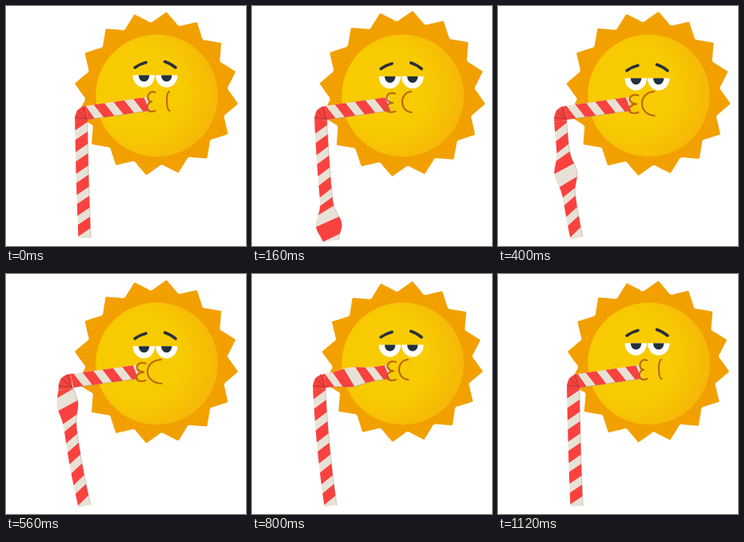
An HTML page for the animation above (1.2 s loop, 300 by 300 pixels).

```html
<!DOCTYPE html>
<html lang="en">
<head>
<meta charset="utf-8">
<title>Sipping sun</title>
<style>
  html, body { margin: 0; width: 100%; height: 100%; overflow: hidden; background: #fff; }
  svg { display: block; width: 100vw; height: 100vh; }
  .line { fill: none; stroke-linecap: round; stroke-linejoin: round; }
</style>
</head>
<body>
<svg viewBox="0 0 300 300">
  <defs>
    <radialGradient id="skin" cx=".36" cy=".45" r=".66">
      <stop offset="0" stop-color="#f8cc00"/>
      <stop offset=".55" stop-color="#f8ca02"/>
      <stop offset=".8" stop-color="#f6bf05"/>
      <stop offset="1" stop-color="#f5b606"/>
    </radialGradient>
  </defs>
  <path id="rays" fill="#f2a000" stroke="#f2a000" stroke-width="2" stroke-linejoin="round"/>
  <circle cx="188.5" cy="112" r="76.3" fill="url(#skin)"/>
  <g id="face">
    <g class="line" stroke="#29303a" stroke-width="3.6">
      <path d="M161 77Q167 72.500 175 70.500"/>
      <path d="M198.500 69.500Q205 71.500 212 77"/>
    </g>
    <g fill="#fff">
      <path d="M158.500 86.500H186A13.750 15.300 0 0 1 158.500 86.500"/>
      <path d="M187 86.500H214.500A13.750 15.300 0 0 1 187 86.500"/>
    </g>
    <g fill="#22303c">
      <path d="M165.800 86.500H179.200A6.700 8 0 0 1 165.800 86.500"/>
      <path d="M194 86.500H207.400A6.700 8 0 0 1 194 86.500"/>
    </g>
  </g>
  <path id="tube" fill="#e8e2d6"/>
  <path id="stripes" fill="#f9423f"/>
  <path id="elbow" fill="#f4433f"/>
  <path id="folds" class="line" stroke="#b93431" stroke-width="1"/>
  <path id="shade" class="line" stroke="#8d6a58" stroke-opacity=".25" stroke-width="1.4"/>
  <g class="line" stroke="#bd6414" stroke-width="2.1">
    <path id="lips"/>
    <path id="cheek"/>
  </g>
</svg>
<script>
const LOOP = 1200, STEP = 80;
const fields = ['time', 'bend', 'mouth', 'drop', 'radius', 'lump', 'swell', 'lip', 'pucker', 'cheek', 'dent', 'puff'];
const poses = [
  [0,    94, 178, 0,   102.5, -5,  0,   177, 5,  204, 200, 24],
  [160,  86, 172, 1.5, 104,   20,  8.5, 167, 9,  199, 184, 26],
  [400,  78, 165, 3.8, 103,   83,  6.5, 163, 10, 195, 175, 30],
  [560,  75, 164, 3.8, 102.5, 130, 5.5, 162, 10, 194, 171, 30],
  [800,  84, 171, 2,   101,   194, 3.6, 168, 9,  195, 180, 25],
  [960,  90, 175, 1,   100.2, 244, 3,   174, 6,  199, 192, 25],
  [1120, 94, 178, 0,   101.5, 276, 0,   177, 5,  204, 200, 24],
];
const $ = id => document.getElementById(id);
const put = (id, d) => $(id).setAttribute('d', d);
const mix = (a, b, k) => a + (b - a) * k;
const pt = p => p[0].toFixed(2) + ' ' + p[1].toFixed(2);
const poly = points => 'M' + points.map(pt).join('L') + 'Z';

function poseAt(time) {
  let i = poses.findIndex(row => row[0] > time);
  if (i < 0) i = poses.length;
  const a = poses[i - 1], b = poses[i] || a;
  const k = b === a ? 0 : (time - a[0]) / (b[0] - a[0]);
  return Object.fromEntries(fields.map((name, n) => [name, mix(a[n], b[n], k)]));
}

// Straight-sided spikes with rounded valleys.
function rayPath(radius) {
  const at = (depth, turn) => {
    const angle = (turn * 22.5 - 83) * Math.PI / 180, r = radius - 1 - depth;
    return pt([188 + r * Math.cos(angle), 109.5 + r * Math.sin(angle)]);
  };
  let d = 'M' + at(0, 0);
  for (let i = 0; i < 16; i++) {
    d += `L${at(11, i + .37)}Q${at(15.5, i + .5)} ${at(11, i + .63)}L${at(0, i + 1)}`;
  }
  return d + 'Z';
}

// A tube along a quadratic curve; side -1 is the outer edge of the bend.
function makeTube(a, c, b, half, offset, pose) {
  const length = Math.hypot(b[0] - a[0], b[1] - a[1]);
  const fromLump = s => (s + offset - pose.lump) / 16;
  const edge = (s, side) => {
    const k = Math.min(1, Math.max(0, s / length));
    const q = n => mix(mix(a[n], c[n], k), mix(c[n], b[n], k), k);
    const dx = mix(c[0] - a[0], b[0] - c[0], k), dy = mix(c[1] - a[1], b[1] - c[1], k);
    const swell = pose.swell * Math.exp(-(fromLump(k * length) ** 2));
    const w = side * (half + swell) / Math.hypot(dx, dy);
    return [q(0) - dy * w, q(1) + dx * w];
  };
  const run = (from, to, side, count) =>
    Array.from({ length: count + 1 }, (_, i) => edge(mix(from, to, i / count), side));
  const band = (from, to, slant, count) => poly([
    ...run(from - slant, to - slant, -1, count),
    ...run(to + slant, from + slant, 1, count),
  ]);
  // The lump stretches the pattern around it.
  const stretch = s => {
    const u = fromLump(s);
    return s + 1.4 * pose.swell * u * Math.exp(-u * u);
  };
  const stripes = (first, gap, width) => {
    let d = '';
    for (let s = first; s < length + 12; s += gap) {
      d += band(stretch(s - width / 2), stretch(s + width / 2), 5, 4);
    }
    return d;
  };
  const outline = 'M' + run(0, length, 1, 30).map(pt).join('L');
  return { length, edge, stripes, outline, body: band(0, length, 0, 30) };
}

function draw(time) {
  const p = poseAt(time);
  put('rays', rayPath(p.radius));
  $('face').setAttribute('transform', `translate(0 ${p.drop.toFixed(2)})`);

  const foot = [98.3, 290 + Math.max(0, p.swell - 4) * Math.exp(-((p.lump / 40) ** 2))];
  const top = [p.bend, 144];
  const stem = makeTube(foot, [mix(p.bend, foot[0], .28), 220], top, 7.8, 0, p);
  const start = [p.bend + 7, 133.5], end = [p.mouth, 122.3];
  const middle = [(start[0] + end[0]) / 2, (start[1] + end[1]) / 2];
  const arm = makeTube(start, middle, end, 8.6, 160, p);

  put('tube', stem.body + arm.body);
  put('stripes', stem.stripes(15, 26.5, 15) + arm.stripes((arm.length - 6) % 25 - 25, 25, 13.5));
  put('shade', stem.outline + arm.outline);

  const left = stem.edge(stem.length, -1), right = stem.edge(stem.length, 1);
  const upper = arm.edge(0, -1), lower = arm.edge(0, 1);
  const corner = [left[0] - 1, upper[1] + 2];
  put('elbow', `M${pt(left)}Q${pt(corner)} ${pt(upper)}L${pt(lower)}L${pt(right)}Z`);
  const inner = [lower[0] - 1, lower[1] - 1];
  put('folds', [.15, .5, .85].map(k => {
    const q = n => mix(mix(left[n], corner[n], k), mix(corner[n], upper[n], k), k);
    return `M${pt([q(0), q(1)])}L${pt(inner)}`;
  }).join(''));

  const x = p.lip, y = 108 + p.drop, tip = x + 6 + p.pucker * .65;
  const low = 131 + p.drop * .5, mid = (y + low) / 2 + .3;
  put('lips', `M${tip} ${y}C${x} ${y - 4} ${x - 3} ${mid - 1} ${x + p.pucker} ${mid}` +
    `C${x - 3} ${mid + 1} ${x - 2} ${low + 5} ${tip} ${low}`);
  const floor = 107 + p.puff;
  put('cheek', `M${p.cheek} 107C${p.dent} 108 ${p.dent} ${floor - 1} ${p.cheek + .5} ${floor}`);
}

function tick() {
  const time = performance.now() % LOOP;
  draw(Math.floor(time / STEP) * STEP);
  requestAnimationFrame(tick);
}
tick();
</script>
</body>
</html>
```
